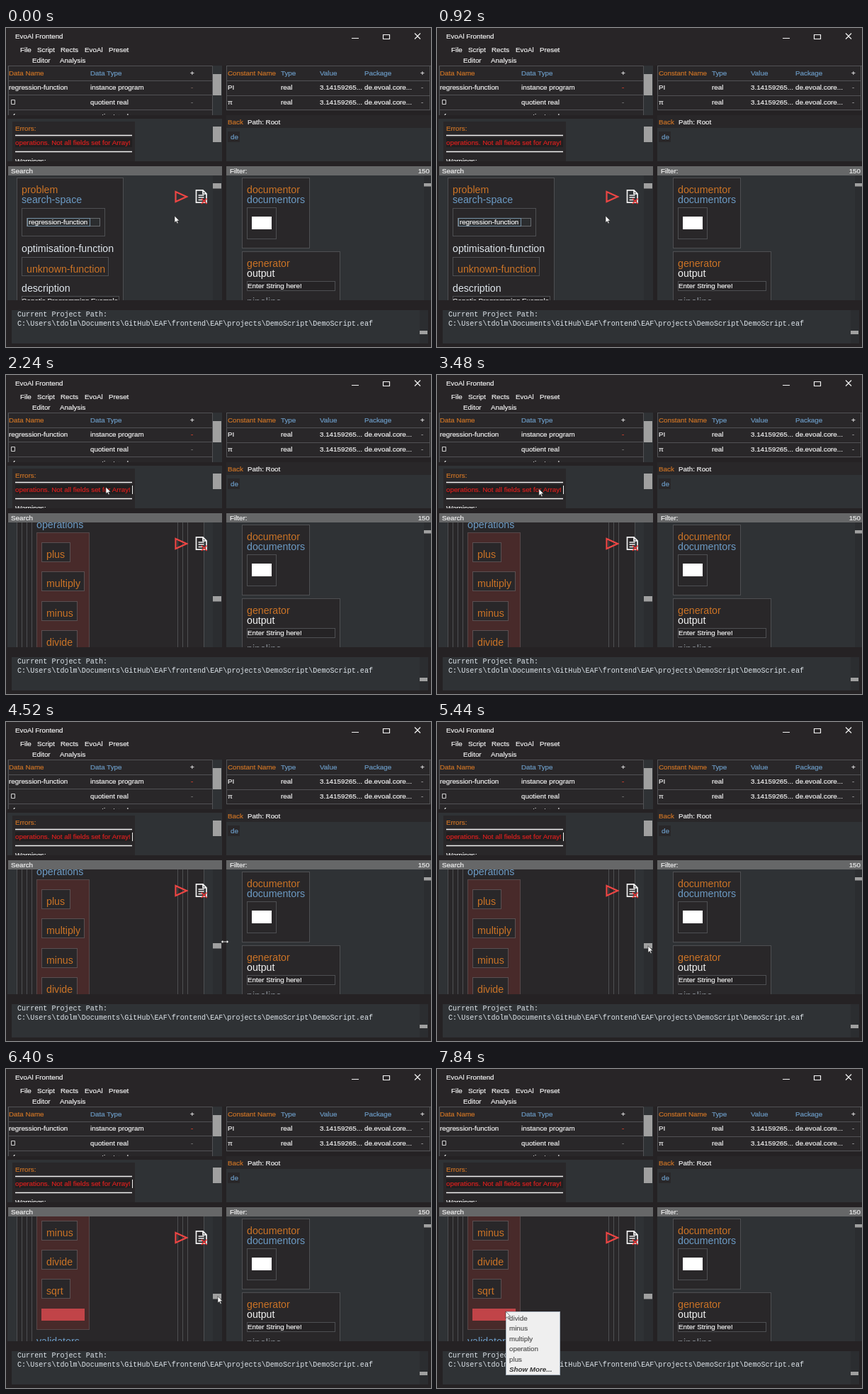
Recreate the animation shown at these times as an HTML page. Size 600x450 px, loop 8000 ms.

```html
<!DOCTYPE html>
<html lang="en">
<head>
<meta charset="utf-8">
<title>EvoAl Frontend</title>
<style>
  html, body { margin: 0; width: 100%; height: 100%; overflow: hidden; background: #252224; }
  #stage { display: block; width: 600px; height: 450px; }
  text { font: 9.8px "Liberation Sans", Arial, sans-serif; white-space: pre; stroke-width: .2px; }
  .big { font-size: 14.2px; stroke: none; }
  .mono { font: 10.08px "Liberation Mono", "Courier New", monospace; stroke: none; }
  .more { font-weight: bold; font-style: italic; stroke: none; }
</style>
</head>
<body>
<svg id="stage" viewBox="0 0 600 450" xmlns="http://www.w3.org/2000/svg"></svg>
<script>
const LOOP = 8000;
const C = {
  panel: '#2f3235', card: '#292729', edge: '#4e4f52', grid: '#525255', thumb: '#a0a0a0',
  orange: '#cb7326', blue: '#6b9ac4', white: '#f2f2f2', pale: '#dfe6ec', red: '#d8201f', bar: '#666768'
};

// Drawing helpers
const rect = (x, y, w, h, fill, stroke) =>
  `<rect x="${x}" y="${y}" width="${w}" height="${h}" fill="${fill || 'none'}"` +
  (stroke ? ` stroke="${stroke}"` : '') + '/>';
const box = (x, y, w, h, fill = C.card, stroke = C.edge) => rect(x + .5, y + .5, w - 1, h - 1, fill, stroke);
const text = (x, y, s, fill = C.white, cls = '', extra = '') =>
  `<text x="${x}" y="${y}" fill="${fill}" stroke="${fill}" class="${cls}" ${extra}>${s}</text>`;
const big = (x, y, s, fill = C.pale) => text(x, y, s, fill, 'big');
const path = (d, stroke, width = 1, fill = 'none') =>
  `<path d="${d}" stroke="${stroke}" stroke-width="${width}" fill="${fill}"/>`;
const clip = (x, y, w, h, body) =>
  `<svg x="${x}" y="${y}" width="${w}" height="${h}" viewBox="${x} ${y} ${w} ${h}">${body}</svg>`;
const group = (id, body) => `<g id="${id}">${body}</g>`;
const row = (y, cells) => cells.map(([x, s, fill]) => text(x, y, s, fill)).join('');

function titleBar() {
  const menus = [[20, 'File'], [44, 'Script'], [77, 'Rects'], [111, 'EvoAl'], [145, 'Preset']];
  return rect(2, 0, 598, 53, '#282527') +
    text(13, 15, 'EvoAl Frontend') +
    path('M488 14.5h10M532.5 9.5h9v6h-9zM577 7.5l8 8m0-8l-8 8', C.white, 1.2) +
    row(34, menus) + row(49, [[37, 'Editor'], [76, 'Analysis']]);
}

function dataTable() {
  return clip(2, 53, 303, 70,
    rect(2, 53, 303, 70, C.panel) + rect(3, 53, 289, 70, C.card) +
    path('M3 53.5H291.5V123M3.5 53V123M3 74.5H291M3 94.5H291M3 115.5H291', C.grid) +
    row(67, [[4, 'Data Name', C.orange], [119, 'Data Type', C.blue], [260, '+']]) +
    row(87, [[4, 'regression-function'], [119, 'instance program']]) +
    text(261, 87, '-', '#77615a', '', 'id="minus"') +
    path('M7.5 101.5h5v6h-5z', '#d0d0d0') +
    row(108, [[119, 'quotient real'], [261, '-', '#777']]) +
    row(128, [[4, ' -f'], [119, 'quotient real'], [261, '-', '#777']]) +
    rect(292, 65, 12, 30, C.thumb));
}

function constTable() {
  const values = (y, name) => row(y, [[313, name], [388, 'real'], [443, '3.14159265...'],
    [506, 'de.evoal.core...'], [586, '-', '#999']]);
  return rect(311, 53, 289, 64, C.card) +
    path('M311 53.5H600M311.5 53V116M598.5 53V116M311 74.5H598M311 95.5H598M311 115.5H598', C.grid) +
    row(67, [[313, 'Constant Name', C.orange], [388, 'Type', C.blue], [443, 'Value', C.blue],
      [506, 'Package', C.blue], [585, '+']]) +
    values(87, 'PI') + values(108, 'π');
}

function errorPanel() {
  return clip(2, 128, 303, 60,
    rect(2, 128, 303, 60, C.panel) + rect(9, 132, 173, 60, C.card) +
    text(13, 145, 'Errors:', C.orange) +
    rect(13, 155, 165, 13, '#211f20') +
    path('M13 151.5H178M13 174.5H178', C.white, 1.4) +
    text(13, 164.5, 'operations. Not all fields set for Array!', C.red) +
    group('caret', path('M178.5 156V168', C.white)) +
    text(13, 191, 'Warnings:') +
    rect(292, 139, 12, 22, C.thumb));
}

function pathPanel() {
  return rect(311, 123, 289, 18, C.card) + rect(311, 141, 289, 47, C.panel) +
    text(313, 136, 'Back', C.orange) + text(341, 136, 'Path: Root') +
    rect(313, 146, 17, 15, C.card) + text(317, 157, 'de', C.blue);
}

function problemCard() {
  return box(15, 211, 151, 190) +
    big(22, 233, 'problem', C.orange) + big(22, 247, 'search-space', C.blue) +
    box(22, 254, 118, 40) + box(29, 268, 104, 12, '#2b2d2f', '#686b6e') +
    box(30, 268, 89, 12, 'none', '#7590a4') + text(32, 277, 'regression-function') +
    big(22, 315.5, 'optimisation-function') +
    box(22, 323, 123, 27) + big(29, 345, 'unknown-function', C.orange) +
    big(22, 371.5, 'description') +
    box(22, 378, 138, 13, '#252325') + text(22, 388, 'Genetic Programming Example');
}

function operations() {
  const names = [['plus', 41], ['multiply', 61], ['minus', 51], ['divide', 51], ['sqrt', 41]];
  const items = names.map(([name, w], i) => {
    const y = Math.round(236 + i * 41.3);
    return box(50, y, w, 28, C.card, '#5a4f51') + big(57, y + 22, name, C.orange);
  });
  return big(43, 216, 'operations', C.blue) + box(43, 222, 75, 251, '#482a2a', '#564849') +
    items.join('') + rect(50, 443, 61, 17, '#c14448') + big(43, 493.5, 'validators', C.blue);
}

function searchPanel() {
  const lines = [15, 22, 29, 36, 242, 249, 256, 279].map(x => `M${x + .5} 208V385`).join('');
  return rect(3, 195, 302, 13, C.bar) + text(7, 205, 'Search') +
    clip(2, 208, 303, 176,
      rect(2, 208, 303, 176, C.panel) +
      group('problem', problemCard()) +
      group('nested', rect(15, 208, 265, 176, C.card) + path(lines, C.edge) + group('ops', operations())) +
      rect(292, 208, 13, 176, '#2b2d30') +
      group('thumb', rect(292, 219, 12, 7.5, C.thumb)) +
      path('M239.5 231L255 238L239.5 245Z', '#ec4644', 2.2) +
      path('M268.5 228.8h9.5l5 5v12.4h-14.5zM278 229v5h5M271.5 236h8M271.5 239h8M271.5 242.5h6', C.white, 1.7) +
      path('M276 240.5l7.5 7.5m0-7.5l-7.5 7.5', '#e83434', 1.7));
}

function filterPanel() {
  return rect(311, 195, 289, 13, C.bar) + text(316, 205, 'Filter:') +
    text(598, 205, '150', C.white, '', 'text-anchor="end"') +
    clip(311, 208, 289, 176,
      rect(311, 208, 289, 176, C.panel) +
      box(333, 211, 96, 100) +
      big(340, 233, 'documentor', C.orange) + big(340, 247, 'documentors', C.blue) +
      box(340, 253, 42, 45) + rect(347, 266, 28, 18, '#fff') +
      box(333, 315, 139, 90) +
      big(340, 337, 'generator', C.orange) + big(340, 351, 'output', C.white) +
      box(340, 357, 125, 14, '#252325') + text(341, 367, 'Enter String here!') +
      big(340, 391, 'pipeline', '#8c9299') +
      rect(590, 208, 10, 176, '#2b2d30') + rect(590, 219, 10, 4.5, C.thumb));
}

function consolePanel() {
  const file = 'C:\\Users\\tdolm\\Documents\\GitHub\\EAF\\frontend\\EAF\\projects\\DemoScript\\DemoScript.eaf';
  return rect(8, 398, 588, 47, C.panel) + rect(584, 398, 12, 47, '#2b2d30') +
    rect(584, 427, 11, 5, C.thumb) +
    text(16, 407, 'Current Project Path:', C.pale, 'mono') + text(16, 420, file, C.pale, 'mono');
}

function popup() {
  const items = ['divide', 'minus', 'multiply', 'operation', 'plus', 'Show More...'];
  return box(97, 342, 77, 90, '#efefef', '#a9b4bf') +
    items.map((s, i) => text(102, 355 + i * 14.4, s, i < 5 ? '#555' : '#333', i < 5 ? '' : 'more')).join('');
}

const arrow = path('M0 0V9.6L2.2 7.6L3.7 10.9L5.2 10.2L3.7 7H6.7Z', '#222', .6, '#fff');
const resize = path('M-5.5 0L-2.5 -2.6V-.7H2.5V-2.6L5.5 0L2.5 2.6V.7H-2.5V2.6Z', '#111', .5, '#fff');

document.getElementById('stage').innerHTML =
  rect(0, 0, 600, 450, '#252224') + titleBar() + dataTable() + constTable() + errorPanel() +
  pathPanel() + searchPanel() + filterPanel() + consolePanel() + group('popup', popup()) +
  group('pointer', group('arrow', arrow) + group('resize', resize));

// Motion: [time, ...values] with eased steps between
const POINTER = [[0, 238, 265], [1000, 238, 265], [1760, 141, 158], [3400, 141, 158], [4440, 309, 310],
  [4640, 309, 310], [5040, 298, 315.7], [5500, 298, 315.7], [6300, 299, 320.5], [6600, 299, 320.5], [7280, 97, 342]];
const SCROLL = [[0, 0], [5500, 0], [6300, 105]];
const CLICK = 1960, MENU = 7440;

function track(keys, t) {
  const i = keys.findIndex(k => k[0] > t);
  if (i < 0) return keys[keys.length - 1].slice(1);
  const [a, b] = [keys[i - 1], keys[i]];
  const u = (t - a[0]) / (b[0] - a[0]);
  const e = u * u * (3 - 2 * u);
  return a.slice(1).map((v, n) => v + (b[n + 1] - v) * e);
}

const el = id => document.getElementById(id);
const show = (id, on) => el(id).setAttribute('visibility', on ? 'inherit' : 'hidden');
const move = (id, x, y) => el(id).setAttribute('transform', `translate(${x.toFixed(2)} ${y.toFixed(2)})`);

function render(t) {
  const [x, y] = track(POINTER, t);
  const scroll = Math.round(track(SCROLL, t)[0]);
  const jumped = t >= CLICK;
  const onSplit = x > 304.5 && x < 311;
  const minus = t < 40 ? '#77615a' : '#d8402c';

  el('minus').setAttribute('fill', minus);
  el('minus').setAttribute('stroke', minus);
  show('problem', !jumped);
  show('nested', jumped);
  show('caret', jumped && t < MENU);
  show('popup', t >= MENU);
  move('ops', 0, -scroll);
  move('thumb', 0, jumped ? 93 + scroll / 21 : 0);
  move('pointer', x, y);
  show('arrow', !onSplit);
  show('resize', onSplit);
}

const start = performance.now();
function tick() {
  render((performance.now() - start) % LOOP);
  requestAnimationFrame(tick);
}
render(0);
requestAnimationFrame(tick);
</script>
</body>
</html>
```
